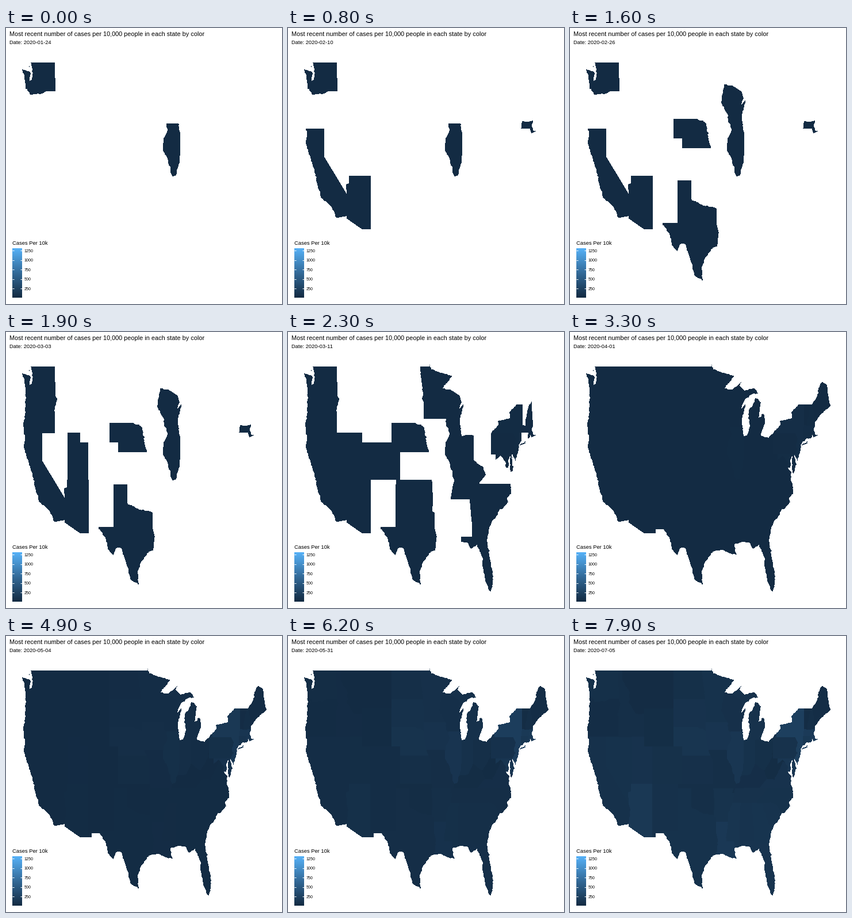
A matplotlib script that plays this animation: 480 by 480 pixels, repeating every 8000 ms.

```python
import math

import matplotlib.pyplot as plt
import numpy as np
from matplotlib.animation import FuncAnimation
from matplotlib.colors import LinearSegmentedColormap
from matplotlib.patches import PathPatch, Polygon
from matplotlib.path import Path

FRAMES, INTERVAL = 80, 100
LAST_DAY = 163
DAYS_PER_FRAME = LAST_DAY / (FRAMES - 1)
ALL_IN = 27  # frame at which every state has reported
TOP_VALUE = 1310
BLUES = LinearSegmentedColormap.from_list(
    "blues", ["#132B43", "#336A98", "#56B1F7"], N=1024)

plt.rcParams["font.family"] = "Liberation Sans"
fig = plt.figure(figsize=(4.8, 4.8), dpi=100, facecolor="white")
ax = fig.add_axes([0, 0, 1, 1])
ax.axis("off")
rng = np.random.default_rng(4)
states = []


def project(points):
    """Degrees west and north to stage pixels."""
    p = np.array(points, float)
    return np.column_stack([28 + (124.7 - p[:, 0]) * 7.375,
                            60 + (49 - p[:, 1]) * 16.45])


def rough(*points):
    """Ragged shore or river through a few key points."""
    out = [points[0]]
    for a, b in zip(points, points[1:]):
        a, b = np.array(a, float), np.array(b, float)
        n = max(1, int(np.hypot(*((b - a) * (7.4, 16.5))) / 2.5))
        for t in np.arange(1, n) / n:
            out.append(tuple(a + (b - a) * t + rng.normal(0, (0.07, 0.032))))
        out.append(tuple(b))
    return out


def box(west, north, east, south):
    return [(west, north), (east, north), (east, south), (west, south)]


def spread(day, peak):
    """Share of the final count reached; growth is fastest at the peak day."""
    def curve(d):
        return 1 / (1 + math.exp((peak - d) / 14))
    return curve(day) / curve(LAST_DAY)


def region(peak, *members):
    """Members: first day (from Jan 24), final cases per 10k, border."""
    for first_day, total, border in members:
        start = max(0, min(ALL_IN, math.ceil((first_day + 5) / DAYS_PER_FRAME)))
        patch = Polygon(project(border), lw=0, antialiased=False, zorder=1)
        ax.add_patch(patch)
        states.append((start, total, peak, patch))


def label(x, y, text, px):
    return ax.text(x, y, text, fontsize=px * 0.72, va="baseline", zorder=5)


# Borders shared by two or more states
columbia = rough((124.4, 46.25), (123.4, 46.2), (122.75, 45.6), (120.5, 45.7),
                 (119, 46)) + [(116.92, 46)]
snake = rough((116.92, 46), (116.5, 45.6), (117.2, 44.4), (117.03, 44.1)) + [(117.03, 42)]
bitterroot = [(116.05, 49)] + rough((116.05, 48), (114.35, 46.65), (114.5, 45.56),
                                    (113, 44.45), (111.05, 44.48))
colorado = rough((114.63, 35), (114.15, 34.27), (114.55, 33), (114.72, 32.72))
mead = [(114.63, 35), (114.7, 36.1), (114.05, 36.2)]
red_north = rough((97.23, 49), (96.8, 46.9), (96.56, 45.94))
sioux = [(96.56, 45.94), (96.85, 45.6), (96.45, 45.3), (96.45, 43.5)]
niobrara = [(104.05, 43), (98.5, 43)] + rough((97.9, 42.8), (97.2, 42.85), (96.45, 42.5))
missouri = rough((96.45, 42.5), (95.85, 40.9), (95.77, 40.58))
kansas_bend = [(95.3, 40), (94.9, 39.75), (94.62, 39.1)]
red_south = rough((94.48, 33.64), (97.2, 33.85), (100, 34.56)) + [(100, 36.5)]
st_croix = rough((92, 46.72), (92.3, 46.1), (92.75, 44.75), (91.2, 43.5))
miss_wi = rough((91.2, 43.5), (91.1, 42.7), (90.64, 42.51))
miss_ia = rough((90.64, 42.51), (90.2, 41.8), (91.05, 41.1), (91.42, 40.38))
miss_mo = rough((91.42, 40.38), (91.45, 39.9), (90.2, 38.7), (89.5, 37.3), (89.15, 37))
bootheel = [(89.7, 36), (90.37, 36), (90.1, 36.5), (94.62, 36.5)]
miss_ar = rough((90.07, 35), (91.1, 33.9), (91.16, 33))
miss_la = rough((91.16, 33), (91.6, 31)) + [(89.75, 31), (89.6, 30.2)]
sabine = [(94.04, 33), (94.04, 31.99)] + rough((93.55, 31.1), (93.8, 29.6))
tombigbee = [(88.2, 35), (88.47, 31.9), (88.4, 30.1)]
chatt = [(85.6, 35), (85.18, 32.87), (85, 32.3), (85, 31)]
st_marys = [(85, 31), (84.86, 30.7), (82.2, 30.57), (82.05, 30.36), (81, 30.7)]
savannah = rough((83.1, 35), (82.6, 34.1), (80.9, 32.05))
carolina = [(83.1, 35), (81.05, 35.1), (79.67, 34.8), (78, 33.4)]
smoky = rough((81.68, 36.59), (83.1, 35.8), (84.3, 35.2), (84.32, 35))
wabash = [(87.53, 42), (87.53, 39.3)] + rough((87.6, 38.7), (88.1, 37.85))
ohio_il = rough((88.1, 37.85), (88.5, 37.1), (89.15, 37))
ohio_in = rough((84.82, 39.1), (86, 38), (88.1, 37.85))
ohio_oh = rough((82.6, 38.4), (83.7, 38.65), (84.82, 39.1))
ohio_wv = rough((80.52, 40.64), (80.85, 39.7), (82.6, 38.4))
menominee = [(90.6, 47.1), (90.42, 46.57), (88.1, 45.9), (87.6, 45.1), (86.7, 45.4), (87.1, 43)]
tug = rough((82.6, 38.4), (81.97, 37.54))
allegheny = rough((81.97, 37.54), (80.3, 37.5), (78.35, 39.4), (77.72, 39.32))
potomac = rough((77.72, 39.32), (77.05, 38.85), (77, 38.3), (76.3, 37.9)) + [(75.1, 38)]
md_wv = [(79.48, 39.72), (79.48, 39.2), (78.35, 39.62), (77.72, 39.32)]
delmarva = [(75.79, 39.72), (75.7, 38.46), (74.9, 38.45)]
delaware = rough((74.7, 41.36), (75.2, 40.65), (74.75, 40.2), (75.42, 39.8))
pa_ny = [(79.76, 42.4), (79.76, 42), (75.35, 42), (74.7, 41.36)]
hudson = [(74.7, 41.36), (73.9, 41), (73.9, 40.45)]
ny_ct = [(73.6, 40.96), (73.5, 41.2), (73.45, 42.05)]
champlain = [(73.27, 42.75), (73.3, 45.1)]
connecticut = rough((71.5, 45.1), (72.3, 43.6), (72.46, 42.73))
merrimack = [(72.46, 42.73), (71.25, 42.74), (70.5, 42.9)]
maine_nh = [(71.08, 45.4), (70.95, 43.4), (70.5, 42.9)]
ri = [(71.38, 42.02), (71.13, 41.65), (71.1, 41.3)]

west = region(
    140,
    (-9, 49, [(126, 49.2), (117.04, 49.2)] + columbia[::-1]),
    (32, 25, columbia + snake[1:] + [(125, 42)]),
    (1, 66, [(125, 42), (120, 42), (120, 39)] + colorado + [(118, 32), (126, 36)]),
    (41, 71, [(120, 42), (114.05, 42)] + mead[::-1] + [(120, 39)]),
    (49, 41, bitterroot + [(111.05, 42)] + snake[::-1] + [(117.04, 49)]),
    (49, 11, bitterroot + [(111.05, 45), (104.05, 45), (104.05, 49)]),
    (47, 27, box(111.05, 45, 104.05, 41)),
    (32, 78, [(114.05, 42), (111.05, 42), (111.05, 41)] + box(109.05, 41, 109.05, 37)[1:3]
     + [(114.05, 37)]),
    (41, 58, box(109.05, 41, 102.05, 37)),
    (2, 135, [(114.05, 37), (109.05, 37), (109.05, 31), (115, 31)] + colorado[::-1] + mead[1:]),
    (47, 62, [(109.05, 37), (103, 37), (103.05, 32), (106.62, 32), (106.62, 31), (109.05, 31)]),
)
plains = region(
    112,
    (47, 49, [(104.05, 49)] + red_north + [(104.05, 45.94)]),
    (46, 78, [(104.05, 45.94)] + sioux + niobrara[::-1]),
    (24, 102, niobrara + missouri[1:] + [(95.3, 40), (102.05, 40), (102.05, 41), (104.05, 41)]),
    (43, 55, [(102.05, 40)] + kansas_bend + [(94.62, 37), (102.05, 37)]),
    (42, 69, red_north + sioux[1:] + st_croix[::-1] + [(89, 47.75), (89, 49.6), (97.23, 49.6)]),
    (44, 98, sioux[-1:] + miss_wi + miss_ia[1:] + [(91.73, 40.6)] + missouri[::-1]),
    (43, 40, [(95.77, 40.58), (91.73, 40.6)] + miss_mo + [(89.5, 36.5)] + bootheel
     + kansas_bend[::-1]),
)
midwest = region(
    105,
    (12, 55, menominee + [(87, 42.51)] + miss_wi[::-1] + st_croix[::-1]),
    (-9, 117, [(87, 42.51)] + wabash + ohio_il[1:] + miss_mo[::-1] + miss_ia[::-1]),
    (42, 71, [(87.53, 42), (86.82, 41.76), (84.81, 41.7)] + ohio_in + wabash[::-1]),
    (45, 50, [(84.81, 41.7), (83.45, 41.73), (83, 42), (80.52, 42.3)] + ohio_wv + ohio_oh),
    (46, 72, [(84.81, 41.7), (83.45, 41.73), (82, 41.8), (82, 46.8), (88, 47.8)] + menominee
     + [(86.82, 41.76)]),
)
south = region(
    132,
    (42, 40, [(103, 37), (94.62, 37), (94.43, 35.4)] + red_south + [(103, 36.5)]),
    (19, 69, [(103.05, 36.5)] + red_south[::-1] + [(94.04, 33.55)] + sabine
     + [(93.8, 25), (106.62, 25), (106.62, 32), (103.05, 32)]),
    (47, 79, bootheel[::-1] + miss_ar + [(94.04, 33), (94.04, 33.55), (94.48, 33.64), (94.43, 35.4)]),
    (45, 140, [(94.04, 33)] + miss_la + [(88.8, 30.1), (88.8, 28.5), (93.8, 28.5)] + sabine[::-1]),
    (42, 37, ohio_il[::-1] + ohio_in[::-1] + ohio_oh[::-1] + tug + [(83.68, 36.6), (89.5, 36.5)]),
    (41, 74, [(89.5, 36.5), (83.68, 36.6)] + smoky + [(90.07, 35), (89.7, 36)]),
    (47, 104, [(90.07, 35)] + tombigbee + miss_la[::-1] + miss_ar[::-1]),
    (49, 89, tombigbee[::-1] + chatt + [(87.6, 31), (87.5, 30.2)]),
    (38, 90, [(85.6, 35)] + savannah + [(80.5, 31.5)] + st_marys[::-1] + chatt[::-1]),
    (37, 93, [(87.6, 31)] + st_marys + [(79, 30), (79, 24), (84, 24), (87.5, 29.5)]),
    (42, 86, carolina + [(80, 32)] + savannah[::-1]),
    (39, 69, smoky[::-1] + [(75.5, 36.55), (74.5, 35.5), (76, 33.8)] + carolina[::-1]),
    (43, 76, [(83.68, 36.6), (81.68, 36.59), (75.5, 36.55)] + potomac[::-1] + allegheny[::-1]),
    (53, 19, ohio_wv[::-1] + [(80.52, 39.72)] + md_wv + allegheny[::-1] + tug[::-1]),
)
northeast = region(
    92,
    (41, 114, md_wv[:1] + delmarva + potomac[::-1] + md_wv[::-1]),
    (47, 124, [(75.5, 39.84), (75.42, 39.8), (75.54, 39.45), (74.95, 38.8)] + delmarva[::-1]),
    (42, 72, [(80.52, 42.3)] + pa_ny + delaware + [(75.79, 39.72), (80.52, 39.72)]),
    (40, 195, hudson + [(73.7, 39.5), (74.9, 38.8), (75.54, 39.45)] + delaware[::-1]),
    (37, 205, pa_ny + hudson + [(71.7, 40.9), (71.8, 41.2)] + ny_ct + champlain
     + [(75, 45.2), (79.9, 43.5)]),
    (43, 20, champlain + connecticut),
    (38, 43, maine_nh + merrimack[::-1] + connecticut[::-1]),
    (8, 160, [(73.45, 42.05), (73.27, 42.75)] + merrimack + [(69.5, 42.9), (69.5, 41.1)] + ri[::-1]),
    (44, 131, ny_ct + [(71.8, 42.02), (71.86, 41.3), (72, 41.2)]),
    (37, 161, [(71.8, 42.02)] + ri + [(71.86, 41.3)]),
    (48, 25, maine_nh + [(69, 42.9), (66, 44), (66, 48), (71, 48)]),
)

# Coast, counterclockwise from the northwest
pacific = rough(
    (122.76, 49), (122.25, 47.9), (122.5, 47.2), (122.9, 47.1), (122.65, 47.95), (123.5, 48.12),
    (124.7, 48.38), (124.05, 46.8), (123.95, 45.5), (124.1, 44), (124.5, 42.85), (124.1, 41.5),
    (124.35, 40.4), (123.8, 39.6), (122.5, 37.8), (121.85, 36.4), (120.65, 34.6),
    (119.3, 34.15), (118.4, 33.75), (117.12, 32.53))
south_line = [(114.72, 32.72), (114.81, 32.5), (111.07, 31.33), (108.21, 31.33), (108.21, 31.78)]
gulf = rough(
    (106.53, 31.78), (105, 30.68), (104.5, 29.65), (103.2, 29), (102.5, 29.75), (101.4, 29.77),
    (100.3, 28.3), (99.1, 26.4), (97.15, 25.9), (97.35, 27.2), (96.6, 28.3), (94.7, 29.4),
    (92.6, 29.58), (91.3, 29.3), (90.2, 29.1), (89.05, 29.1), (89.5, 29.6), (89.55, 30.2),
    (88, 30.4), (86.4, 30.38), (85.3, 29.7), (84, 30.1), (82.65, 28.7), (82.8, 27.9),
    (81.8, 26.1), (81.2, 25.3), (80.7, 25.15))
atlantic = rough(
    (80.7, 25.15), (80.2, 25.7), (80.03, 26.8), (81, 29.2), (81.45, 30.7), (80.85, 32.1),
    (79.2, 33.2), (78.55, 33.86), (77.95, 33.9), (76.5, 34.7), (76.8, 35), (75.85, 35.5),
    (75.9, 36.55), (76.3, 36.95), (76.3, 37.9), (77, 38.3), (76.4, 38.3), (76.5, 39.1),
    (76.1, 39.5), (76.25, 38.3), (75.95, 37.3), (75.05, 38.6), (75.55, 39.6), (74.9, 38.95),
    (74, 40.1), (74, 40.7), (73.75, 40.85))
new_england = rough(
    (73.75, 40.85), (72.9, 41.25), (71.45, 41.42), (71.35, 41.75), (71.2, 41.48), (70.65, 41.55),
    (69.95, 41.67), (70.05, 42.03), (70.05, 41.8), (70.5, 41.78), (71, 42.3), (70.7, 42.65),
    (70.65, 43.1), (69.1, 44), (66.97, 44.8), (67.45, 45.6), (67.79, 47.07), (69.15, 47.45),
    (70, 46.7), (70.3, 45.9), (71.5, 45.01))
lakes_east = rough(
    (74.7, 45), (76.3, 44.2), (76.2, 43.55), (79.05, 43.27), (78.9, 42.87), (81.7, 41.5),
    (83.45, 41.73), (82.42, 43), (82.6, 43.9), (82.95, 44.07), (83.9, 43.65), (83.4, 45.2),
    (84.75, 45.78))
lakes_west = rough(
    (84.75, 45.78), (85.6, 44.8), (86.25, 44.6), (86.5, 43.95), (86.2, 42.6), (86.8, 41.76),
    (87.5, 41.65), (87.9, 43.2), (87, 45.2), (88, 44.6), (87.2, 45.5), (85.5, 46.05),
    (83.9, 46.1), (85, 46.75), (87.3, 46.5), (88.4, 46.95), (87.9, 47.45), (90.4, 46.57),
    (92, 46.7), (89.6, 48), (92, 48.33), (94.6, 48.75), (95.15, 49.38))
mainland = (pacific + south_line + gulf + atlantic + new_england + lakes_east
            + lakes_west + [(95.15, 49)])
islands = [
    rough((74, 40.6), (72.5, 40.82), (71.9, 41.07), (72.5, 40.92), (72.3, 41.15), (73.75, 40.85)),
    [(70.8, 41.35), (70.5, 41.35), (70.6, 41.47)],
    [(70.2, 41.25), (69.98, 41.25), (70.05, 41.38)],
    [(122.6, 48.2), (122.4, 47.95), (122.65, 48.4)],
    box(123.1, 48.65, 122.85, 48.47)[::-1],
]

# The sea is a sheet with the land cut out; the ground closes hairline gaps.
rings = [np.vstack([p, p[:1]]) for p in map(project, [box(130, 53, 60, 20), mainland] + islands)]
sea = Path.make_compound_path(*[Path(r, closed=True) for r in rings])
ax.add_patch(PathPatch(sea, fc="white", lw=0, antialiased=False, zorder=2))
ground = ax.add_patch(Polygon(rings[1], fc=BLUES(0.03), lw=0, antialiased=False, zorder=0))

# Text and colour bar
label(6, 14, "Most recent number of cases per 10,000 people in each state by color", 10.88)
date = label(6, 28, "", 9.25)
label(11, 377, "Cases Per 10k", 9.4)
ax.imshow(np.linspace(1, 0, 86)[:, None], cmap=BLUES, aspect="auto",
          extent=(11, 28, 469, 383), zorder=3)
for value in range(250, 1251, 250):
    y = 469.5 - value * 0.0658
    label(32, y + 2.7, str(value), 7.2)
    for x in (11, 24.6):
        ax.plot([x, x + 3.4], [y, y], color="white", lw=0.72, zorder=4,
                solid_capstyle="butt")
ax.set(xlim=(0, 480), ylim=(480, 0))


def update(i):
    day = round(i * DAYS_PER_FRAME)
    date.set_text(f"Date: {np.datetime64('2020-01-24') + day}")
    ground.set_visible(i >= ALL_IN)
    for start, total, peak, patch in states:
        patch.set_visible(i >= start)
        patch.set_color(BLUES(total * spread(day, peak) / TOP_VALUE))
    return []


anim = FuncAnimation(fig, update, frames=FRAMES, interval=INTERVAL,
                     init_func=lambda: update(0), repeat=True, repeat_delay=0)
plt.show()
```
